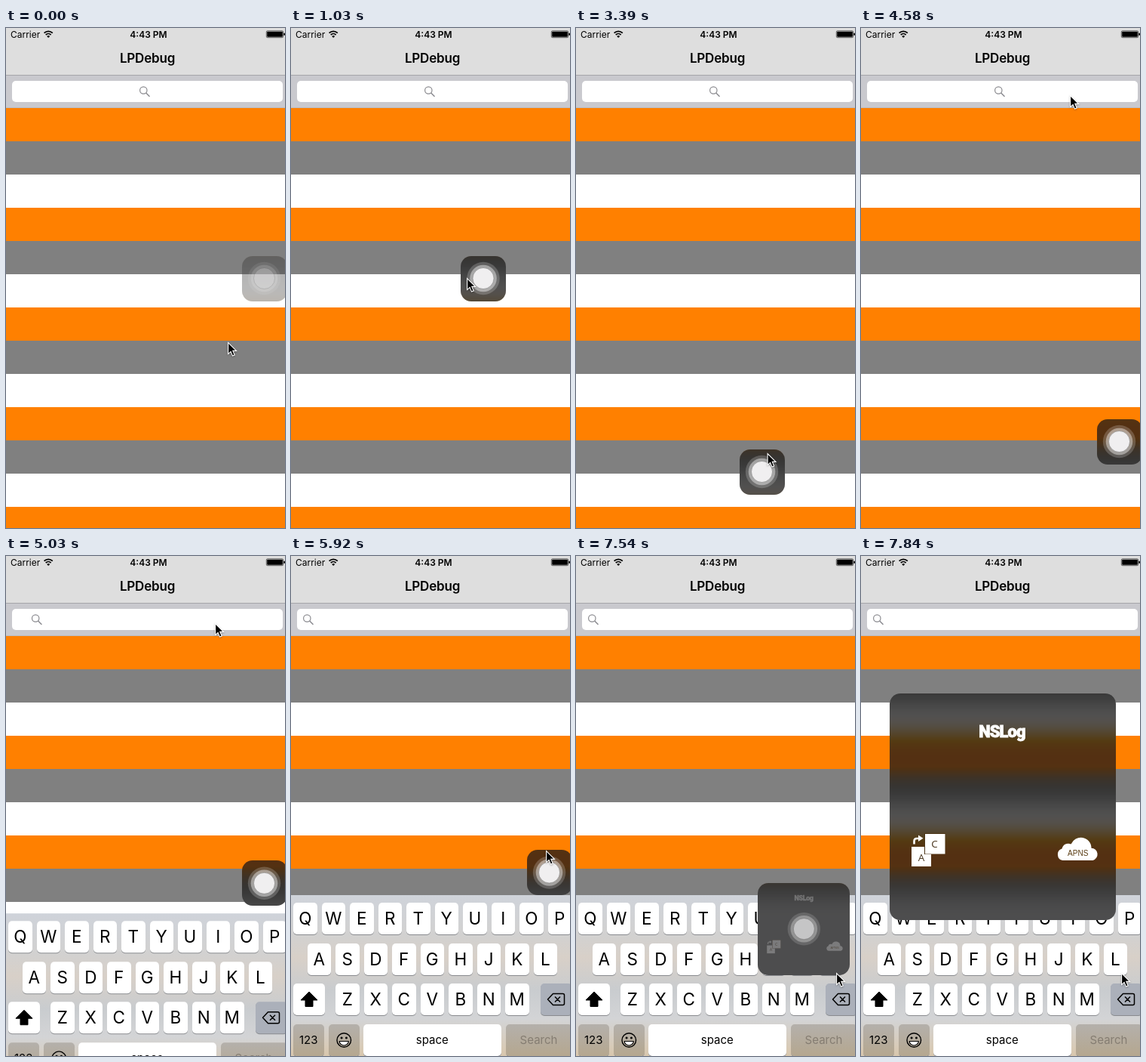
Animation of 370 by 662 pixels, one loop 8 s. Source, as an HTML page:

```html
<!DOCTYPE html>
<html lang="en">
<head>
<meta charset="utf-8">
<title>Floating debug button</title>
<style>
  html, body { margin: 0; width: 100%; height: 100%; overflow: hidden; }
  body { position: relative; background: #fff; font-family: Inter, sans-serif; color: #000; }
  body > *, .key, #glass, #tint { position: absolute; box-sizing: border-box; }
  svg { display: block; overflow: visible; }
  .rows { background: repeating-linear-gradient(#ff8000 0 44px, #808080 44px 88px, #fff 88px 132px); }
  #rows { left: 0; top: 106px; width: 375px; height: 561px; }
  #bar { left: 0; top: 0; width: 375px; height: 106px; }
  #bar .status { font-size: 12px; }
  #bar .bold { font-weight: 600; text-anchor: middle; }
  #caret { left: 36px; top: 74px; width: 2px; height: 20px; background: #426bf2; }
  #keys { left: 0; top: 449px; width: 375px; height: 218px;
    background: linear-gradient(#cfd3da, #d2d1d0 25%, #d8d0c8 38%, #c9cccf 58%, #d3d4d6 75%, #d8cbb8 92%, #d8c5a8); }
  .key { height: 42px; border-radius: 5px; background: #fff; box-shadow: 0 1px 0 #898b8f;
    font-size: 22.5px; line-height: 42px; text-align: center; }
  .word { font-size: 15px; }
  .dim { background: #abb0ba; }
  .warm { background: linear-gradient(#b4b0ab, #b5a78f); }
  .pale { color: #857d72; }
  .key svg { width: 100%; height: 100%; }
  #box { left: 0; top: 0; border-radius: 14px; overflow: hidden; }
  #glass { width: 495px; height: 660px; filter: blur(14px) saturate(1.8); }
  #shade { position: absolute; left: 0; width: 100%; height: 320px; background: #e6e6e8; }
  #tint { inset: 0; background: rgba(25, 25, 25, .74); }
  #knob, #menu, #arrow { left: 0; top: 0; }
  #knob { width: 60px; height: 60px; }
  #menu { width: 300px; height: 300px; transform-origin: 0 0; }
  #menu .title { font: 900 22px Roboto, sans-serif; font-stretch: 75%; letter-spacing: -.9px; }
  #arrow { width: 14px; height: 20px; filter: drop-shadow(0 1px 1px rgba(0, 0, 0, .3)); }
</style>
</head>
<body>
<div id="rows" class="rows"></div>

<svg id="bar" viewBox="0 0 375 106">
  <rect width="375" height="62" fill="#dedede"/>
  <rect y="62" width="375" height="1" fill="#a6a6aa"/>
  <rect y="63" width="375" height="43" fill="#c9c9ce"/>
  <rect y="105" width="375" height="1" fill="#bcbcc1"/>
  <rect x="8" y="70" width="359" height="28" rx="5" fill="#fff"/>
  <text class="status" x="6" y="12.5">Carrier</text>
  <path d="M50.6 6.7a8 8 0 0 1 11.2 0M52.8 9a4.9 4.9 0 0 1 6.8 0" fill="none" stroke="#000" stroke-width="1.8"/>
  <path d="M56.2 13l-2-2.1a2.8 2.8 0 0 1 4 0z"/>
  <text class="status bold" x="189" y="12.5">4:43 PM</text>
  <rect x="345.3" y="3.8" width="22.4" height="8.9" rx="1.5" fill="none" stroke="#000" stroke-width=".6"/>
  <rect x="346.2" y="4.7" width="20.6" height="7.1" rx=".8"/>
  <path d="M368.3 6.5a1.8 1.8 0 0 1 0 3.6z"/>
  <text class="bold" x="187.5" y="46" font-size="17" letter-spacing="-.2">LPDebug</text>
  <g id="lens" fill="none" stroke="#8a8a8f" stroke-width="1.2">
    <circle cx="182.3" cy="82.5" r="4.7"/>
    <path d="M185.7 86l4.8 4.8" stroke-width="1.5"/>
  </g>
</svg>
<div id="caret"></div>
<div id="keys"></div>

<div id="box">
  <div id="glass" class="rows"><div id="shade"></div></div>
  <div id="tint"></div>
</div>
<svg id="knob" viewBox="-30 -30 60 60">
  <circle r="21.7" fill="#fff" fill-opacity=".2"/>
  <circle r="17.8" fill="#fff" fill-opacity=".42"/>
  <circle r="14" fill="#f0eff0" stroke="#777" stroke-opacity=".6" stroke-width=".9"/>
</svg>
<svg id="menu" viewBox="37.5 181.5 300 300" fill="#fff">
  <text class="title" x="187" y="239.5" text-anchor="middle" stroke="#fff" stroke-width=".8">NSLog</text>
  <path d="M67 385h26v26h-26z"/>
  <path d="M84 367h28v28h-28z" fill="#4b3416"/>
  <path d="M85 368h26.5v26.5h-26.5z"/>
  <path d="M70.5 381.5v-4q0-3.5 3.5-3.5h3" fill="none" stroke="#fff" stroke-width="2.6"/>
  <path d="M76 369.5l6.5 4.3-6.5 4.3z"/>
  <g fill="#49351d" text-anchor="middle" font-family="Open Sans, sans-serif" font-size="13.5">
    <text x="80" y="404">A</text>
    <text x="97.5" y="386">C</text>
  </g>
  <path d="M267.5 403a8 8 0 0 1-1-15.5a8.5 8.5 0 0 1 12-6a14 14 0 0 1 27 5.2a8.3 8.3 0 0 1 2 16.3z"/>
  <text x="287.7" y="397" fill="#5a3c12" text-anchor="middle" font-family="Liberation Sans, Arial, sans-serif" font-size="10">APNS</text>
</svg>
<svg id="arrow" viewBox="0 0 14 20">
  <path d="M.6.6v15l3.5-3.2 2.4 5.7 2.7-1.1-2.4-5.6h4.7z" stroke="#fff" stroke-width="1.1"/>
</svg>

<script>
const $ = id => document.getElementById(id);

function key(x, row, w, label, kind = '') {
  const el = document.createElement('div');
  el.className = 'key ' + kind;
  el.style.cssText = `left:${x}px;top:${10 + row * 53.5}px;width:${w}px`;
  el.innerHTML = label;
  $('keys').append(el);
}
const icon = (w, body) => `<svg viewBox="0 0 ${w} 42">${body}</svg>`;

[['QWERTYUIOP', 3], ['ASDFGHJKL', 21.5], ['ZXCVBNM', 59]].forEach(([letters, x], row) =>
  [...letters].forEach((c, i) => key(x + i * 37.5, row, 31.5, c)));

key(3, 2, 42, icon(42, '<path d="M21 11l11 11h-6v8.5h-10v-8.5h-6z" stroke="#000" stroke-linejoin="round"/>'));
key(330.5, 2, 42, icon(42,
  '<path d="M9.5 21l7-7.5h13a2 2 0 0 1 2 2v11a2 2 0 0 1-2 2h-13zM19 17.5l7 7m0-7l-7 7" fill="none" stroke="#000" stroke-width="1.5" stroke-linejoin="round"/>'), 'dim');
key(3, 3, 40.5, '123', 'word warm');
key(50, 3, 40.5, icon(40,
  '<circle cx="20" cy="21" r="9.3" fill="none" stroke="#000" stroke-width="1.4"/>' +
  '<circle cx="16.8" cy="18" r="1.5"/><circle cx="23.2" cy="18" r="1.5"/>' +
  '<path d="M14 22.5h12a6 5.5 0 0 1-12 0z" fill="#fff" stroke="#000" stroke-width="1.2"/>'), 'warm');
key(96, 3, 182.5, 'space', 'word');
key(284.5, 3, 88, 'Search', 'word warm pale');

// The screen refreshes once per tick; all times below are in ticks.
const LOOP = 8000, TICKS = 54, TICK = LOOP / TICKS;
const EDGE = 342.5, LAG = .5;

// Turning points of the pointer: [tick, x, y].
const path = [
  [0, 294, 416], [4, 338, 331], [7, 233, 331], [8, 236, 331], [12, 336.5, 326.5], [13, 336.5, 326.5],
  [15, 193, 533], [17, 188, 636], [21, 201.5, 641], [24, 279.5, 524], [28, 290, 160], [31, 277, 89],
  [35, 277, 89], [40, 338, 390], [46, 361, 563], [49, 345, 552]
];
// The button starts at height y, is dragged, then docks; lift is how far the keyboard pushes it.
const drags = [
  { from: 4, to: 8, y: 331.5, dock: 331.5, lift: 0 },
  { from: 13, to: 24, y: 331.5, dock: 547.5, lift: 128.5 },
  { from: 40, to: 45, y: 419, dock: 550.5, lift: 0 }
];

const mix = (a, b, f) => a + (b - a) * f;
const clamp = f => Math.min(1, Math.max(0, f));
const easeOut = f => 1 - (1 - clamp(f)) ** 2;
const smooth = f => clamp(f) ** 2 * (3 - 2 * clamp(f));

const wake = n => mix(.4, 1, clamp((n - 2) / 2));
const typing = n => easeOut((n - 32) / 3);
const opening = n => smooth((n - 50) / 3);

function pointer(n) {
  const i = path.findIndex(p => p[0] > n);
  if (i < 0) return path[path.length - 1].slice(1);
  const [t0, x0, y0] = path[i - 1], [t1, x1, y1] = path[i], f = (n - t0) / (t1 - t0);
  return [mix(x0, x1, f), mix(y0, y1, f)];
}

// While held the button trails the pointer; once released it glides to the edge.
function button(n) {
  const d = drags.filter(d => n >= d.from).pop();
  if (!d) return [EDGE, drags[0].y];
  const [gx, gy] = pointer(d.from);
  const [px, py] = pointer(Math.max(d.from, Math.min(n, d.to) - LAG));
  const f = easeOut((n - d.to) / 2);
  return [mix(EDGE + px - gx, EDGE, f), mix(d.y + py - gy, d.dock, f) - d.lift * typing(n)];
}

const move = (id, x, y, more = '') => $(id).style.transform = `translate(${x}px,${y}px)${more}`;

function draw(ms) {
  const n = Math.min(TICKS - 1, Math.floor((ms + 20) / TICK));
  const [bx, by] = button(n), alpha = wake(n), up = typing(n), open = opening(n);

  move('arrow', ...pointer(n));
  move('keys', 0, (1 - up) * 218);
  $('lens').setAttribute('transform', `translate(${-161 * up})`);
  const blink = (n * TICK) % 1000;
  $('caret').style.opacity = up === 1 && blink > 50 && blink < 520 ? 1 : 0;

  const size = mix(60, 300, open);
  const left = mix(bx, 187.5, open) - size / 2, top = mix(by, 331.5, open) - size / 2;
  const box = $('box').style;
  box.width = box.height = size + 'px';
  box.left = left + 'px';
  box.top = top + 'px';
  box.opacity = alpha;
  $('glass').style.left = -60 - left + 'px';
  $('glass').style.top = 106 - top + 'px';
  $('shade').style.top = 343 + (1 - up) * 320 + 'px';
  move('knob', left + size / 2 - 30, top + size / 2 - 30);
  $('knob').style.opacity = alpha * (1 - open);
  move('menu', left, top, ` scale(${size / 300})`);
  $('menu').style.opacity = open;
}

const start = performance.now();
function loop() {
  draw((performance.now() - start) % LOOP);
  requestAnimationFrame(loop);
}
loop();
</script>
</body>
</html>
```
